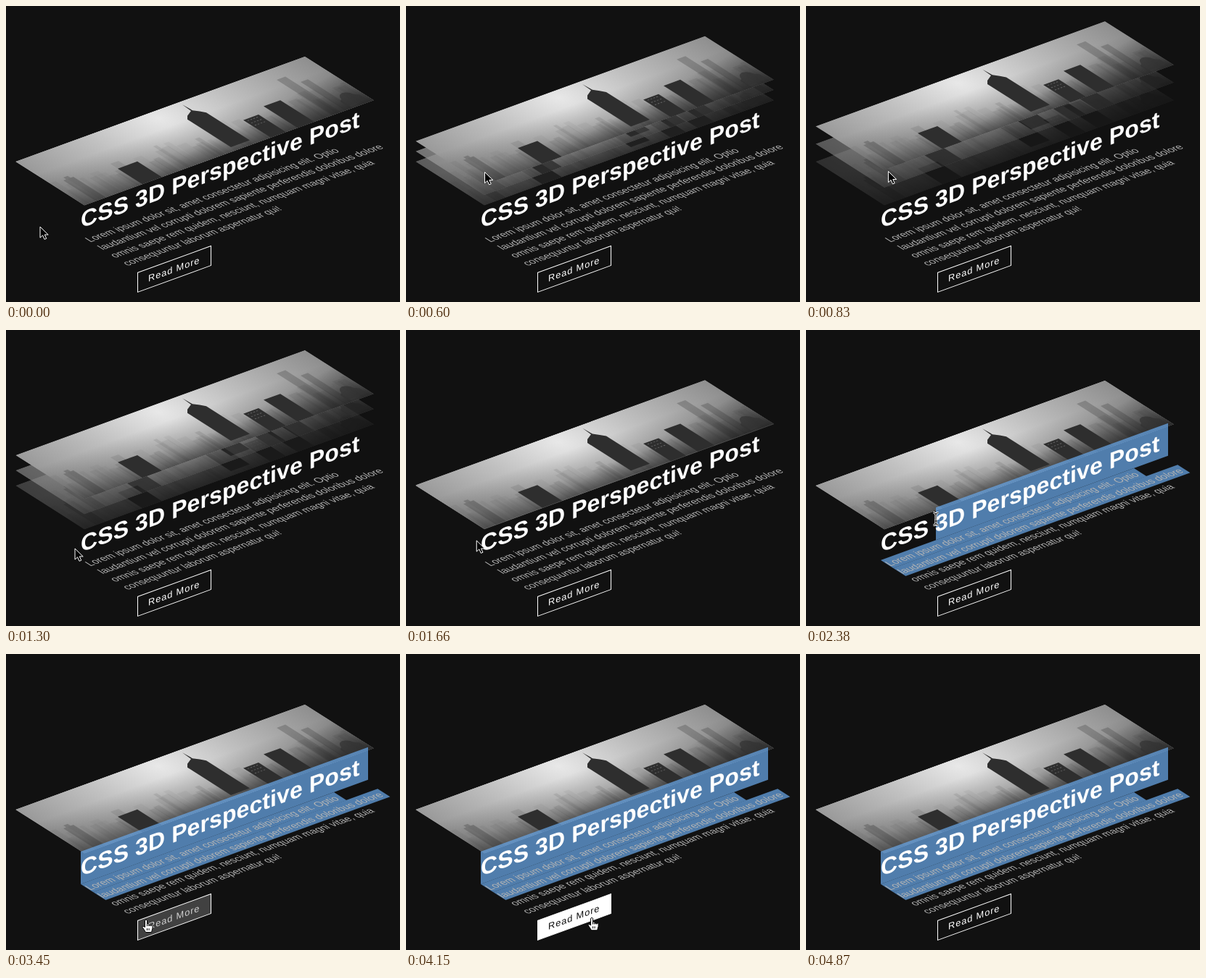
Recreate the animation shown at these times as an HTML page. Size 543 by 409 pixels, loop 5.59 s.

```html
<!DOCTYPE html>
<html lang="en">
<head>
<meta charset="utf-8">
<title>CSS 3D Perspective Post</title>
<style>
  html, body { margin: 0; width: 100%; height: 100%; overflow: hidden; background: #111; }
  svg { display: block; width: 543px; height: 409px; }
  text { font-family: "Liberation Sans", Arial, sans-serif; }
</style>
</head>
<body>
<svg viewBox="0 0 543 409">
  <defs>
    <radialGradient id="sky" gradientUnits="userSpaceOnUse" cx="185" cy="12" r="225">
      <stop offset="0" stop-color="#e8e8e8"/>
      <stop offset=".4" stop-color="#c0c0c0"/>
      <stop offset="1" stop-color="#8a8a8a"/>
    </radialGradient>
    <linearGradient id="haze" x1="0" y1="0" x2="0" y2="1">
      <stop offset=".3" stop-color="#222" stop-opacity="0"/>
      <stop offset=".7" stop-color="#222" stop-opacity=".22"/>
      <stop offset="1" stop-color="#222" stop-opacity=".6"/>
    </linearGradient>
    <linearGradient id="corner" x1=".6" y1=".4" x2="1" y2="1">
      <stop offset=".3" stop-color="#181818" stop-opacity="0"/>
      <stop offset="1" stop-color="#181818" stop-opacity=".6"/>
    </linearGradient>
    <clipPath id="frame"><rect width="399" height="95"/></clipPath>
    <g id="photo" clip-path="url(#frame)">
      <rect width="399" height="95" fill="url(#sky)"/>
      <g id="skyline" fill="#444"></g>
      <path d="M16 95V50h4v-4h6v4h4v45zM342 95V18h12v77zM360 95V33h10v62z" fill="#555" opacity=".4"/>
      <rect width="399" height="95" fill="url(#haze)"/>
      <rect width="399" height="95" fill="url(#corner)"/>
      <path d="M368 90V80l4-3q2-7 9-8 7 1 9 8l4 3v10z" fill="#333" opacity=".7"/>
      <g fill="#2e2e2e">
        <path d="M225 5l1 13 5 5 4 5v60h-26V28l5-5 10-5z"/>
        <path d="M80 95V61h27v34zM257 95V57h21v38zM294 95V48h23v47z"/>
      </g>
      <path d="M260 60h15M260 65h15M260 70h15" stroke="#666" stroke-dasharray="2 2"/>
    </g>
    <path id="caret" d="M-3.5-8.5Q0-8.5 0-6 0-8.5 3.5-8.5M0-6V6M-3.5 8.5Q0 8.5 0 6 0 8.5 3.5 8.5M-2 3H2" fill="none"/>
  </defs>

  <g id="layers"></g>
  <g id="selection" fill="#68a7e8" fill-opacity=".72"></g>

  <text transform="matrix(1 -.364 0 1 103 307)" font-size="32" font-weight="700" letter-spacing=".1" fill="#fff">CSS 3D Perspective Post</text>
  <g id="copy" transform="matrix(1 -.364 1 .636 103 318)" font-size="12.65" fill="#b4b4b4"></g>

  <g transform="matrix(1 -.364 0 1 181 368)">
    <rect id="button" x=".5" y=".5" width="101" height="27" fill="#fff" stroke="#fff"/>
    <text id="label" x="15" y="18.5" font-size="12.8" letter-spacing=".9">Read More</text>
  </g>

  <g id="cursors" stroke-linejoin="round">
    <path id="arrow" d="M0 0V15.2L3.6 11.9 6 17.4 8.7 16.3 6.3 11H11.2z" fill="#000" stroke="#fff"/>
    <g id="beam">
      <use href="#caret" stroke="#fff" stroke-width="3"/>
      <use href="#caret" stroke="#000"/>
    </g>
    <path id="hand" d="M-1.500 10.500V1Q0-1 1.500 1V9 6Q4 4 4 9 4 5 6.500 9 9 6 9 9V12L7.500 17.500H-.5L-5 10.500Q-5 8-1.500 10.500M1.500 12V15M4 12V15" fill="#fff" stroke="#000"/>
  </g>
</svg>
<script>
const LOOP = 5590, TICK = 118.8, LAST_TICK = 41;
const SLOPE = 0.364, SPREAD = 50, LEFT = 103;
const TITLE_TOP = 273, TITLE_HEIGHT = 45, LINE_HEIGHT = 17.2;
const DRAG_START = 1960, DRAG_END = 2970;
const $ = id => document.getElementById(id);
const clamp = (v, lo, hi) => Math.max(lo, Math.min(hi, v));
function set(el, attrs) {
  for (const name in attrs) el.setAttribute(name, attrs[name]);
}
function add(parent, tag, attrs) {
  const el = parent.appendChild(document.createElementNS("http://www.w3.org/2000/svg", tag));
  set(el, attrs);
  return el;
}

// Faint buildings in the fog
let seed = 11;
const random = () => (seed = seed * 16807 % 2147483647) / 2147483647;
for (let x = 0; x < 399; x += 4 + random() * 8) {
  const y = 47 + random() * 22;
  add($("skyline"), "rect", { x, y, width: 4 + random() * 9, height: 95 - y, opacity: 0.04 + random() * 0.1 });
}

[
  "Lorem ipsum dolor sit, amet consectetur adipisicing elit. Optio",
  "laudantium vel corrupti dolorem sapiente perferendis doloribus dolore",
  "omnis saepe rem quidem, nesciunt, numquam magni vitae, quia",
  "consequuntur laborum aspernatur qui!"
].forEach((line, i) => add($("copy"), "text", { y: 13.2 + i * LINE_HEIGHT }).textContent = line);

// Back to front: opacity once lifted
const layers = [0.2, 0.5, 1].map((opacity, i) =>
  ({ opacity, lift: SPREAD * i / 2, el: add($("layers"), "use", { href: "#photo" }) }));

// Title bar and two text lines, each with its right end
const bars = [396, 349, 392].map((end, row) => {
  const plane = row ? "matrix(1 -.364 1 .636 103 318)" : "matrix(1 -.364 0 1 103 273)";
  const y = row ? (row - 1) * LINE_HEIGHT : 0;
  const height = row ? LINE_HEIGHT : TITLE_HEIGHT;
  return { end, el: add($("selection"), "rect", { transform: plane, y, height }) };
});

// Pointer stops: time, x, y
const stops = [
  [180, 47, 305], [597, 109, 229], [1070, 118, 228], [1307, 95, 302], [1663, 97, 291],
  [1990, 526, 191], [2257, 250, 275], [2376, 179, 261], [2970, 103, 270], [3100, 103, 270],
  [3445, 193, 367], [3683, 228, 365], [4050, 228, 365], [4515, 349, 362]
];
function pointerAt(t) {
  const next = stops.findIndex(stop => stop[0] >= t);
  const i = next < 0 ? stops.length - 1 : Math.max(1, next);
  const [t0, x0, y0] = stops[i - 1], [t1, x1, y1] = stops[i];
  const k = clamp((t - t0) / (t1 - t0), 0, 1);
  return [x0 + (x1 - x0) * k, y0 + (y1 - y0) * k];
}

// cubic-bezier(.25, .1, .25, 1)
function ease(t) {
  if (t <= 0 || t >= 1) return clamp(t, 0, 1);
  const bezier = (a, b, u) => 3 * a * u * (1 - u) ** 2 + 3 * b * u * u * (1 - u) + u ** 3;
  let lo = 0, hi = 1;
  for (let i = 0; i < 24; i++) {
    const mid = (lo + hi) / 2;
    if (bezier(0.25, 0.25, mid) < t) lo = mid; else hi = mid;
  }
  return bezier(0.1, 1, lo);
}
const hover = (t, enter, leave) => ease((t - enter) / 500) - ease((t - leave) / 500);

// The drag runs backwards from the end of the second text line
function drawSelection(t) {
  const [x, y] = pointerAt(Math.min(t, DRAG_END));
  const across = x - LEFT;
  const below = y + SLOPE * across - TITLE_TOP - TITLE_HEIGHT;
  const focusRow = below < 0 ? 0 : below < LINE_HEIGHT ? 1 : 2;
  const focus = across - Math.max(0, below);
  bars.forEach(({ end, el }, row) => {
    const hidden = t < DRAG_START || row < focusRow;
    const start = hidden ? end : row === focusRow ? clamp(focus, 0, end) : 0;
    set(el, { x: start, width: end - start });
  });
}

function cursorAt(t) {
  if (t < 1720) return "arrow";
  if (t < 3400) return "beam";
  if (t < 4380) return "hand";
  return t < 4570 ? "arrow" : "";
}

function draw(t) {
  const spread = hover(t, 430, 1238);
  for (const { el, lift, opacity } of layers) {
    set(el, {
      transform: `matrix(1 ${-SLOPE} 1 ${1 - SLOPE} 13 ${215 - lift * spread})`,
      opacity: 1 - (1 - opacity) * spread
    });
  }
  drawSelection(t);

  const fill = hover(t, 3367, 4375), ink = Math.round(255 - 238 * fill);
  set($("button"), { "fill-opacity": fill });
  set($("label"), { fill: `rgb(${ink},${ink},${ink})` });

  set($("cursors"), { transform: `translate(${pointerAt(t)})` });
  const shown = cursorAt(t);
  for (const el of $("cursors").children) set(el, { display: el.id === shown ? "inline" : "none" });
}

function tick() {
  const t = performance.now() % LOOP;
  draw(Math.min(Math.floor((t + 12) / TICK), LAST_TICK) * TICK);
  requestAnimationFrame(tick);
}
tick();
</script>
</body>
</html>
```
